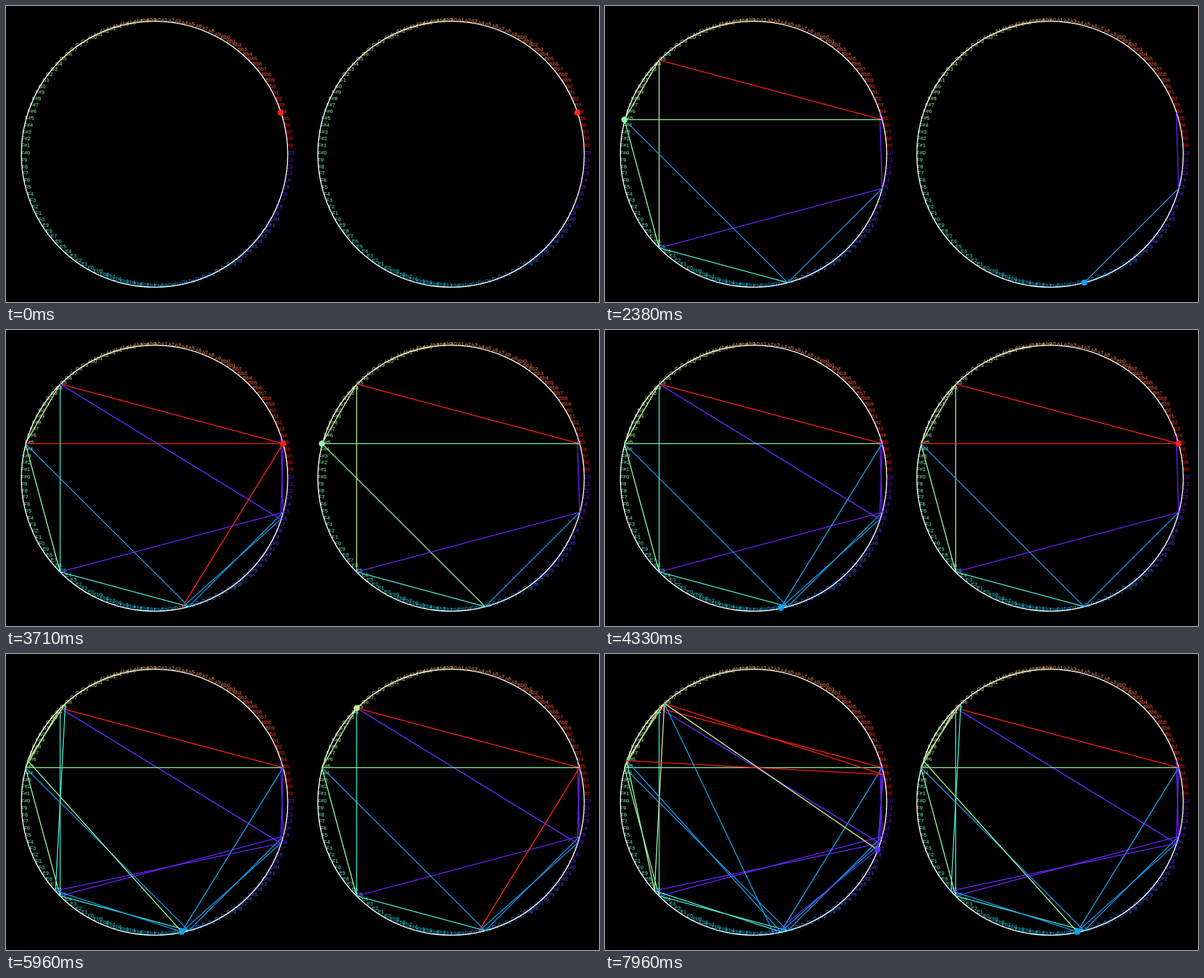
An HTML page with a canvas that plays this animation: 1024 px wide and 512 px high, repeating every 8 s.

```html
<!DOCTYPE html>
<html>
<head>
<meta charset="utf-8">
<style>
html, body { margin: 0; width: 100%; height: 100%; overflow: hidden; background: #000; }
canvas { display: block; }
</style>
</head>
<body>
<canvas id="stage" width="1024" height="512"></canvas>
<script>
const ctx = document.getElementById('stage').getContext('2d');
const LOOP = 8000, BEAT = 160, LAG = 12, RADIUS = 230;
const NAMES = ['C', 'C#', 'D', 'Eb', 'E', 'F', 'F#', 'G', 'Ab', 'A', 'Bb', 'B'];

// Pitches in tenths of a semitone above C0; the tune drifts sharp as it repeats.
const MELODY = [
  114, 5, 25, 65, 75, 45, 5, 25, 45, 75, 115, 65, 25, 45, 65,
  115, 6, 75, 45, 65, 75, 6, 26, 115, 65, 75, 115, 26, 46, 6,
  115, 6, 26, 66, 76, 46, 26, 26, 46, 76, 116, 66, 26, 46, 66,
  116, 7, 76, 27, 7
];

// Rainbow from violet through green to red over one octave.
function colour(pitch) {
  const x = pitch / 120;
  const rgb = [Math.abs(2 * x - 0.5), Math.sin(Math.PI * x), Math.cos(Math.PI * x / 2)];
  return `rgb(${rgb.map(c => Math.round(255 * Math.min(1, c)))})`;
}

// Centre of the whole pixel where a pitch sits on the dial.
function point(pitch) {
  const a = pitch * Math.PI / 60;
  return [Math.cos(a), Math.sin(a)].map(c => Math.floor(256 + RADIUS * c + 1e-6) + 0.5);
}

function drawDial() {
  ctx.font = '9px "Liberation Sans", Arial, sans-serif';
  for (let p = 0; p < 120; p++) {
    const [x, y] = point(p);
    ctx.fillStyle = colour(p);
    ctx.fillText(NAMES[Math.floor(p / 10)] + p % 10, x - 0.5, y + 0.5);
  }
  ctx.strokeStyle = '#fff';
  ctx.lineWidth = 1.6;
  ctx.beginPath();
  ctx.arc(256.5, 256.5, RADIUS, 0, Math.PI * 2);
  ctx.stroke();
}

// Each chord appears once, in the colour of the note it last led to.
function chordsUpTo(last) {
  const chords = new Map();
  for (let i = 1; i <= last; i++) {
    const [from, to] = [MELODY[i - 1], MELODY[i]];
    const key = Math.min(from, to) + '-' + Math.max(from, to);
    chords.delete(key);
    chords.set(key, [from, to]);
  }
  return chords.values();
}

function drawVoice(offsetX, beat) {
  const last = Math.max(0, Math.min(beat, MELODY.length - 1));
  ctx.save();
  ctx.translate(offsetX, 0);
  drawDial();
  ctx.lineWidth = 1.6;
  for (const [from, to] of chordsUpTo(last)) {
    ctx.strokeStyle = colour(to);
    ctx.beginPath();
    ctx.moveTo(...point(from));
    ctx.lineTo(...point(to));
    ctx.stroke();
  }
  ctx.fillStyle = colour(MELODY[last]);
  ctx.beginPath();
  ctx.arc(...point(MELODY[last]), 5.3, 0, Math.PI * 2);
  ctx.fill();
  ctx.restore();
}

function frame() {
  const beat = Math.floor(performance.now() % LOOP / BEAT);
  ctx.fillStyle = '#000';
  ctx.fillRect(0, 0, 1024, 512);
  drawVoice(0, beat);
  drawVoice(512, beat - LAG);
  requestAnimationFrame(frame);
}
frame();
</script>
</body>
</html>
```
